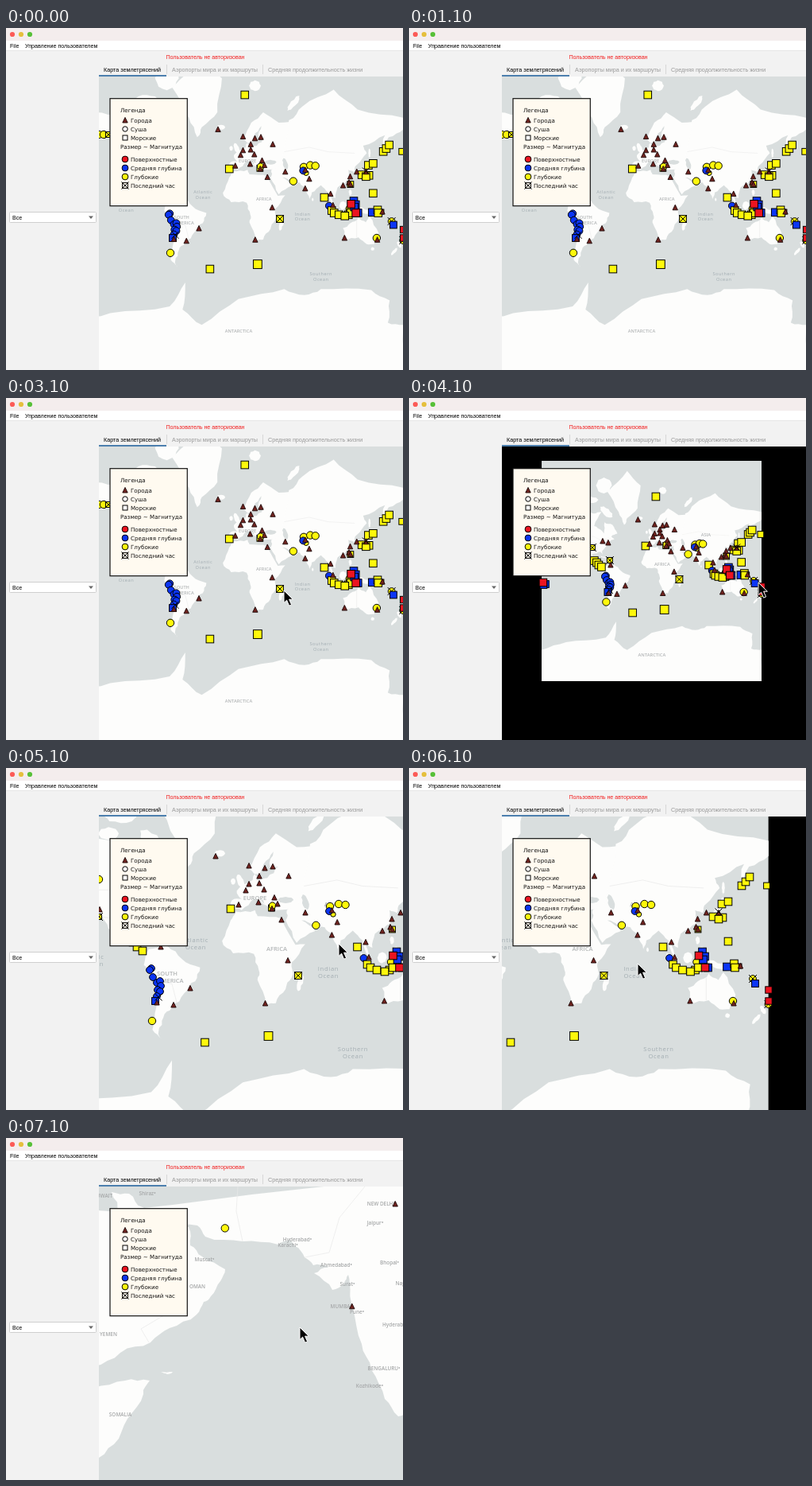
An HTML page that plays this animation: 500x430 px, repeating every 8 s.

```html
<!DOCTYPE html>
<html lang="ru">
<head>
<meta charset="utf-8">
<title>Карта землетрясений</title>
<style>
html, body { margin: 0; width: 100%; height: 100%; overflow: hidden; background: #fff; }
svg { display: block; width: 500px; height: 430px; }
text { font-family: "Liberation Sans", Arial, sans-serif; font-size: 7.1px; }
.tab text { font-size: 7.2px; }
.legend text { font-family: "DejaVu Sans", sans-serif; fill: #111; }
.place text { font-family: "Open Sans", sans-serif; font-size: 7.6px; font-weight: 600; fill: #b3b6b7; text-anchor: middle; }
.place .sea { font-weight: 400; letter-spacing: .7px; fill: #a3adb2; }
#wide text { font-size: 11.5px; }
#near text { font-size: 6.4px; fill: #a5a7a8; }
.land { fill: #fdfdfc; }
.water { fill: #d9dede; }
.border { fill: none; stroke: #e9e9e8; stroke-width: .7; }
</style>
</head>
<body>
<svg viewBox="0 0 500 430">
  <defs>
    <clipPath id="panel"><rect x="117" y="61" width="383" height="369"/></clipPath>
    <clipPath id="world"><rect x="21.3" y="-37" width="554" height="554"/></clipPath>
  </defs>
  <rect width="500" height="430" fill="#f2f2f2"/>
  <rect width="500" height="16" fill="#f4eded"/>
  <rect y="16" width="500" height="12.5" fill="#fff"/>
  <path d="M0 28.5H500" stroke="#dedede" stroke-width=".7"/>
  <circle cx="8" cy="8" r="3.1" fill="#fc5b57"/>
  <circle cx="19" cy="8" r="3.1" fill="#e5bf3c"/>
  <circle cx="30" cy="8" r="3.1" fill="#57c038"/>
  <text x="5" y="24.5">File</text>
  <text x="24" y="24.5">Управление пользователем</text>
  <text x="251" y="38.6" text-anchor="middle" fill="#f21d1d">Пользователь не авторизован</text>
  <g class="tab">
    <text x="123" y="54.6">Карта землетрясений</text>
    <text x="209" y="54.6" fill="#999">Аэропорты мира и их маршруты</text>
    <text x="330" y="54.6" fill="#999">Средняя продолжительность жизни</text>
  </g>
  <path d="M202.5 46V58M323.5 46V58" stroke="#cfcfcf" stroke-width=".8"/>
  <rect x="4.5" y="231.5" width="109" height="13" rx="1" fill="#fff" stroke="#c6c6c6" stroke-width=".8"/>
  <text x="8" y="240.8">Все</text>
  <path d="M104 236.5h6l-3 3.6z" fill="#666"/>
  <g clip-path="url(#panel)">
    <rect x="117" y="61" width="383" height="369"/>
    <g id="far" clip-path="url(#world)"></g>
    <g id="near"></g>
    <g id="marks"></g>
    <g class="legend" id="legend"></g>
  </g>
  <path d="M117 60H202" stroke="#4c7fae" stroke-width="1.8"/>
  <path id="cursor" d="M0 0V15.5L3.6 12.2 6.6 19.2 9.6 17.9 6.6 11.2H11.4Z" stroke="#fff"/>
</svg>
<script>
const $ = id => document.getElementById(id);

// Base map: a Mercator square of side SIZE with its corner at (OX, OY)
const SIZE = 554, OX = 21.3, OY = -37;
const project = ([lon, lat]) => [
  OX + (lon + 180) / 360 * SIZE,
  OY + SIZE / 2 - Math.log(Math.tan(Math.PI / 4 + lat * Math.PI / 360)) * SIZE / (2 * Math.PI)
];

let seed = 7;
const rnd = () => (seed = seed * 16807 % 2147483647) / 2147483647 - .5;
const pairs = list => list.flatMap((v, i) => i % 2 ? [[list[i - 1], v]] : []);
const line = pts => 'M' + pts.map(p => p.map(v => v.toFixed(2)).join(' ')).join('L');

// Coastline through a few points, roughened by midpoint displacement
function coast(pts, depth = 2) {
  if (!depth) return line(pts) + 'Z';
  return coast(pts.flatMap((a, i) => {
    const b = pts[(i + 1) % pts.length], dx = b[0] - a[0], dy = b[1] - a[1];
    const len = Math.hypot(dx, dy) || 1, off = rnd() * Math.min(len * .3, 4) / len;
    return [a, [(a[0] + b[0]) / 2 - dy * off, (a[1] + b[1]) / 2 + dx * off]];
  }), depth - 1);
}
let world = '';
const shape = (kind, d) => `<path class="${kind}" d="${d}"/>`;
const land = (...list) => { world += shape('land', coast(pairs(list).map(project))); };
const border = (...list) => { world += shape('border', line(pairs(list).map(project))); };
function isle(lon, lat, rx, ry, tilt = 0, kind = 'land') {
  const [x, y] = project([lon, lat]), c = Math.cos(tilt), s = Math.sin(tilt);
  world += shape(kind, coast([...Array(8).keys()].map(i => {
    const u = rx * Math.cos(i * Math.PI / 4), v = ry * Math.sin(i * Math.PI / 4);
    return [x + u * c - v * s, y + u * s + v * c];
  }), 1));
}

// North America, Greenland
land(-168,66, -156,71, -128,70, -95,68, -82,69, -94,59, -82,55, -78,52, -77,62, -64,60, -56,52, -66,49, -61,46, -70,43,
  -76,36, -81,31, -80,25.5, -84,30, -97,27, -95,18, -88,21, -83,10, -78,8, -95,16, -110,24, -118,34, -124,40, -124,48,
  -137,58.5, -152,59, -164,54.6, -160,60);
land(-45,60, -54,69, -72,78, -40,83.4, -18,80, -23,71, -40,65);
// South America
land(-77,8, -62,10.5, -50,0, -35,-7, -39,-18, -48,-27, -58,-37, -65,-43, -69,-51, -66,-55, -74,-50, -71,-30, -70,-18, -81,-5);
// Africa
land(-6,36, 10,37, 12,33, 32,31, 43,11.5, 51,12, 40,-3, 40,-15, 35,-24, 27,-34, 19,-34.5, 12,-17, 13,-9, 9,4, -8,4.5,
  -17,14.5, -10,30);
// Europe
land(-9,37, -9,43, -1,44, -5,48.5, 8,54, 10,57, 11,54, 20,55, 29,60, 22,60, 25,65.5, 17,61, 14,55.5, 5,59, 14,67, 27,71,
  44,67, 68,68, 68,36, 27,37, 23,40, 22.5,36.5, 14,45, 18,40, 9,44, -1,37);
// Asia
land(35,30, 44,13, 59,22, 48,30, 57,26, 67,25, 73,20, 77.5,8, 80,15, 90,22.5, 98,15, 103,2, 101,13, 106,9, 108,20,
  121,28, 120,37, 126,35, 129,41, 140,50, 136,55, 160,61, 157,51, 164,60, 180,64, 180,69, 130,72, 104,77.6, 70,73, 55,68,
  45,40, 36,37);
// Australia, New Guinea
land(114,-23, 116,-35, 131,-32, 140,-38, 148,-38, 153,-28, 143,-11, 139,-17, 131,-12, 122,-18);
land(131,-1, 146,-6, 150,-10, 138,-8);
// Antarctica
land(-180,-78, -140,-75, -75,-73, -58,-63.5, -61,-74, -40,-78, 0,-70.5, 50,-66.5, 72,-69, 90,-66.5, 145,-67, 165,-71,
  163,-77.5, 180,-78, 180,-86, -180,-86);
// Islands
isle(-74, 69, 20, 9, .7);
isle(-110, 71, 13, 8);
isle(-100, 75, 20, 8);
isle(-78, 80, 20, 20);
isle(-19, 65, 7, 4);
isle(-2, 53.5, 4, 9, -.4);
isle(-8, 53.3, 3, 4);
isle(18, 78.5, 10, 9);
isle(60, 74, 16, 5, -.9);
isle(47, -19, 3.5, 11, .25);
isle(137, 36, 11, 2.5, -.8);
isle(143, 43.5, 3, 3);
isle(143, 50, 2, 8);
isle(81, 7.5, 1.6, 2.7);
isle(101, 0, 10, 2.5, .8);
isle(114, 1, 6, 7);
isle(110, -7.5, 7, 1.5, .2);
isle(121, -2, 3, 5);
isle(122, 15, 2.5, 5);
isle(125, 8, 3.5, 3);
isle(146.5, -42, 3, 3);
isle(175.5, -38.5, 3, 6, -.5);
isle(170, -44, 2.5, 8, .7);
isle(-79, 22, 8, 1.5, .3);
isle(35, 43.3, 10, 4, 0, 'water');
isle(51, 42, 4, 10, -.3, 'water');
border(-123,49, -95,49, -83,45, -67,47);
border(-117,32.5, -106,31.5, -97,26);
border(50,51, 77,54, 98,51, 127,50);
border(129,-15, 129,-32);
border(-70,-18, -58,-20, -54,-34);

const label = ([s, x, y, cls = '']) => `<text class="${cls}" x="${x}" y="${y + 2.8}">${s}</text>`;
const places = (id, list) => `<g class="place" id="${id}">${list.map(label).join('')}</g>`;
const sea = (name, x, y) => [[name, x, y, 'sea'], ['Ocean', x, y + 8.7, 'sea']];
$('far').innerHTML = `<rect class="water" x="${OX}" y="${OY}" width="${SIZE}" height="${SIZE}"/>` + world +
  places('mid', [
    ['EUROPE', 313.5, 163], ['AFRICA', 341, 227], ['SOUTH', 203, 258], ['AMERICA', 207, 267], ['ASIA', 409, 171],
    ['ANTARCTICA', 298.7, 449], ...sea('Atlantic', 239, 216), ...sea('Indian', 406, 252.5),
    ...sea('Southern', 437, 353), ...sea('Pacific', 110, 237)
  ]) +
  places('wide', [['AFRICA', 325, 224], ['ASIA', 435, 150], ['ANTARCTICA', 299, 452]]);

// Close view of the Arabian Sea, in stage pixels
const shore = (...list) => shape('land', coast(pairs(list)));
const india = shore(510,50, 510,340, 494,350, 477,328, 460,291, 448,259, 437,214, 433,183, 431,172, 426,183, 411,191,
  388,170, 406,163, 387,160, 376,150, 364,136, 357,128, 343,134, 298,130, 251,124, 241,110, 205,106, 172,87, 155,70,
  133,68, 144,95, 110,95);
const arabia = shore(110,90, 142,92, 165,118, 230,112, 232,135, 247,149, 276,165, 270,180, 258,199, 249,206, 240,222,
  206,239, 182,257, 144,270, 110,287);
const africa = shore(110,314, 150,305, 181,305, 173,322, 153,353, 136,385, 110,408);
const soqotra = shore(195,294, 210,294, 203,297);
$('near').innerHTML = '<rect class="water" x="117" y="61" width="383" height="369"/>' + india + arabia + africa + soqotra +
  shape('border', 'M298 130L290 92 292 61M376 150L407 144 420 100 452 61M180 257L170 240 229 205') +
  places('towns', [
    ['KUWAIT', 122, 72], ['Shiraz•', 178, 69], ['OMAN', 241, 186], ['YEMEN', 129, 246], ['SOMALIA', 144, 347],
    ['Muscat•', 250, 152], ['Hyderabad•', 367, 127], ['Karachi•', 355, 134], ['Ahmedabad•', 416, 159], ['Surat•', 430, 183],
    ['MUMBAI', 422, 211], ['Pune•', 442, 218], ['NEW DELHI', 472, 82], ['Jaipur•', 465, 106], ['Bhopal•', 483, 156],
    ['Nagpur', 502, 182], ['Hyderabad', 491, 234], ['BENGALURU•', 476, 289], ['Kozhikode•', 458, 311]
  ]);

// Markers keep their size at every zoom
const YELLOW = '#fff80c', BLUE = '#0b35f5', RED = '#ec1420';
const cross = r => `<path d="M${-r} ${-r}L${r} ${r}M${-r} ${r}L${r} ${-r}" stroke="#000"/>`;
const square = (c, r = 4.8) => `<rect x="${-r}" y="${-r}" width="${2 * r}" height="${2 * r}" fill="${c}" stroke="#000"/>`;
const disc = (c, r = 4.7) => `<circle r="${r}" fill="${c}" stroke="#000"/>`;
const city = '<path d="M0 -3.6L3.2 3H-3.2Z" fill="#70231f" stroke="#1c0808" stroke-width=".9"/>';
const marks = [];
const put = (art, ...list) => pairs(list).forEach(([x, y]) => marks.push({ x, y, art }));

put(disc(YELLOW), 64,119.6, 72,119.6, 117,140, 184,318, 408,174, 419,171, 427.5,172, 390.4,197.8);
put(disc(YELLOW, 3.2), 412,184);
put(square(YELLOW, 3.5) + cross(5), 80,119.6, 117,187, 149,181, 193,213);
put(square(YELLOW), 154,214, 160,219, 165,225, 172,230, 250.5,345, 283,177, 309,53, 442.5,225, 516.5,171, 524.5,168);
put(square(YELLOW), 541.5,148, 546.5,143, 551.5,137, 524.5,218, 505.5,187, 517.5,188, 512.5,190);
put(square(YELLOW, 5.4), 330.5,337);
put(square(YELLOW, 3.9), 334.5,176, 486.5,203, 573,148);
put(disc(YELLOW, 4.2), 335.5,173);
put(disc(BLUE, 4.4), 183,252, 181,254, 185,263, 190,270, 194,268, 195,274, 191,279, 194,281, 190,287, 407,180, 450.5,239);
put(square(BLUE, 4.4), 188,293, 31,273, 26,275);
put(square(RED), 25,269);
put(disc(YELLOW), 485,244, 530.5,293);
put(square(YELLOW), 455,247, 459,251, 467,254, 483,254, 487,251, 477,256);
put(square(BLUE), 492,231, 495,237, 493,241, 499,251, 523,250);
put(square(RED), 487.5,236, 495.5,251);
put(square(RED, 3), 538.5,249);
put(square(YELLOW), 532,246, 533,251);
put(square(YELLOW, 4.4) + cross(5), 368,261);
put(disc(YELLOW, 4.4) + cross(5), 555.5,265);
put(square(BLUE, 4.4), 558.5,271);
put(disc(YELLOW, 4.4) + cross(5), 575,297);
put(square(RED, 4.2), 575.5,279, 575.5,293);
put(city, 264,111, 306,123, 336,124, 326,126, 356,136, 319,136, 319,145, 306,146, 302,154, 325,153, 338,163, 318,169,
  342,171, 293,172, 335,177, 347,191, 377,182, 410.5,179, 417.2,194, 410.4,210.1);
put(city, 355,242, 326.5,296, 476.5,293, 453,219, 457,238, 474,205, 486,190, 484,200, 486.5,203, 497,182, 512.5,182,
  232,277, 211,298, 190,295, 195,225, 175,165, 189,169, 118,178, 531.5,296, 540,249);
put(cross(4.5), 512.5,181, 192,288);

$('marks').innerHTML = marks.map(m => `<g>${m.art}</g>`).join('');
const nodes = [...$('marks').children];

const rows = [
  [103, 'Легенда'], [116, 'Города', city], [127, 'Суша', disc('#fff', 3.2)], [138, 'Морские', square('#fff', 3)],
  [149, 'Размер ~ Магнитуда'], [165, 'Поверхностные', disc(RED, 3.9)], [176, 'Средняя глубина', disc(BLUE, 3.9)],
  [187, 'Глубокие', disc(YELLOW, 3.9)], [198, 'Последний час', square('none', 3.4) + cross(4.6)]
];
$('legend').innerHTML = '<rect x="131" y="88.7" width="97.3" height="135" fill="#fffaf0" stroke="#111" stroke-width="1.2"/>' +
  rows.map(([y, s, icon]) => `<text x="${icon ? 157 : 144}" y="${y + 2.7}">${s}</text>` +
    (icon ? `<g transform="translate(150 ${y})">${icon}</g>` : '')).join('');

// Each step: start time, zoom, shift and cursor tip
const steps = [
  { at: 0, k: .75, x: 69, y: 44.3 },
  { at: 3100, k: .75, x: 69, y: 44.3, tip: [350, 242] },
  { at: 4100, k: .5, x: 156.4, y: 97.5, tip: [440, 232] },
  { at: 5100, k: 1, x: 0, y: 0, tip: [419, 221] },
  { at: 6100, k: 1, x: -122.5, y: 0, tip: [288, 246] },
  { at: 7100, k: 8, x: -2847.4, y: -1469, tip: [370, 238] }
];
const LOOP = 8000;
const show = (id, on) => $(id).setAttribute('display', on ? 'inline' : 'none');
let current;

function draw(t) {
  const s = steps.filter(p => p.at <= t).pop();
  if (s === current) return;
  current = s;
  $('far').setAttribute('transform', `matrix(${s.k} 0 0 ${s.k} ${s.x} ${s.y})`);
  show('far', s.k < 8);
  show('near', s.k === 8);
  show('mid', s.k > .5);
  show('wide', s.k === .5);
  marks.forEach((m, i) => nodes[i].setAttribute('transform', `translate(${s.x + s.k * m.x} ${s.y + s.k * m.y})`));
  show('cursor', s.tip);
  if (s.tip) $('cursor').setAttribute('transform', `translate(${s.tip})`);
}

const start = performance.now();
function tick() {
  draw((performance.now() - start) % LOOP);
  requestAnimationFrame(tick);
}
tick();
</script>
</body>
</html>
```
